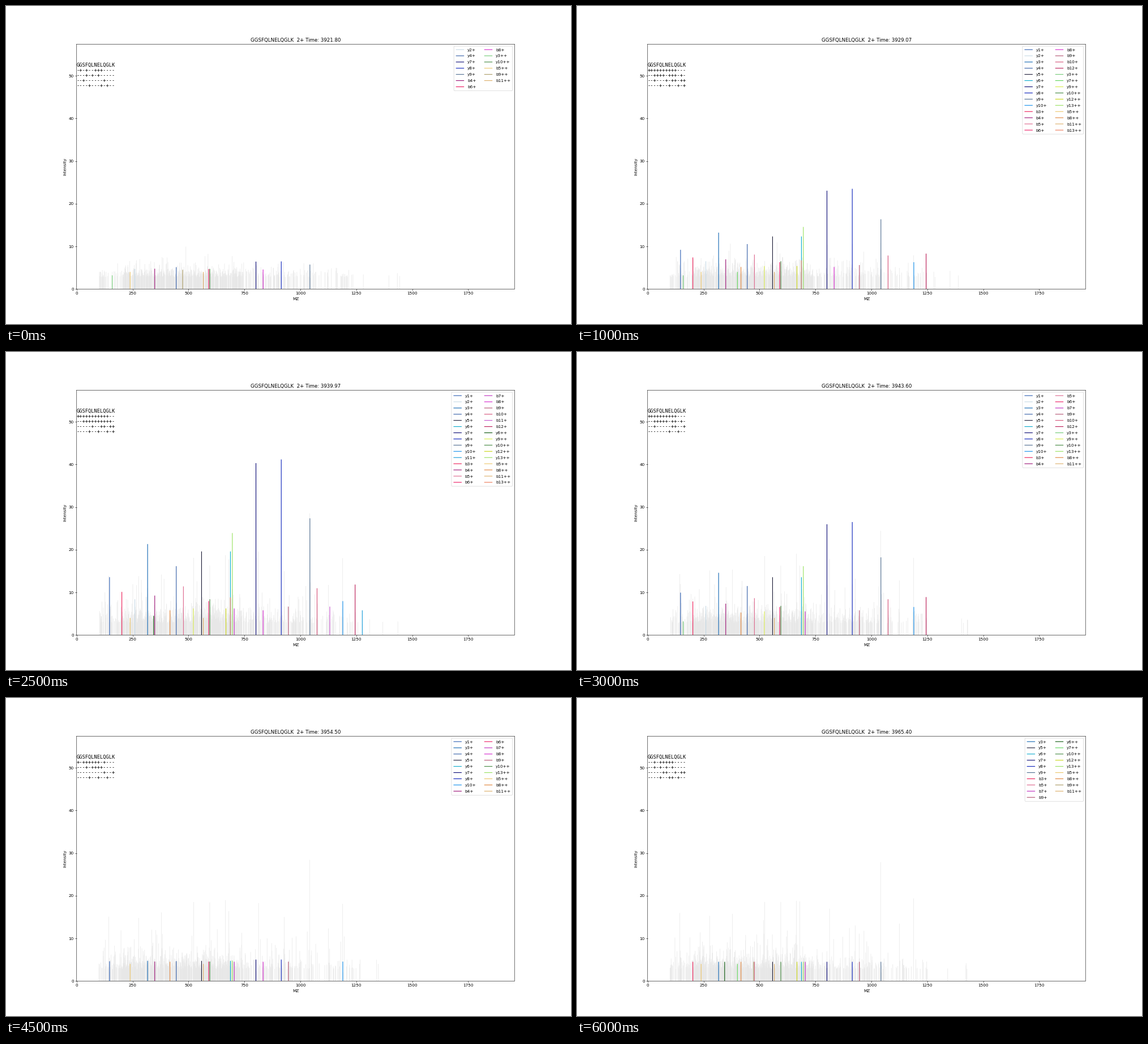
A matplotlib script for the animation above (6500 ms loop, 998 by 561 pixels).

```python
import numpy as np
import matplotlib.pyplot as plt
from matplotlib.animation import FuncAnimation

DPI = 52
N_SCANS = 13
SEQ = "GGSFQLNELQGLK"
MASS = dict(G=57.02146, S=87.03203, F=147.06841, Q=128.05858,
            L=113.08406, N=114.04293, E=129.04259, K=128.09496)
PROTON, WATER = 1.00728, 18.01056
TAIL = 4.5  # fragment height far from the elution apex

ions = {}


def ion(name, color, apex, seen):
    """Register a fragment with its apex height and the scans it is seen in."""
    charge = name.count("+")
    n = int(name[1:].rstrip("+"))
    part = SEQ[:n] if name[0] == "b" else SEQ[-n:]
    mass = sum(MASS[c] for c in part) + (WATER if name[0] == "y" else 0)
    scans = set()
    for span in seen.split():
        first, _, last = span.partition("-")
        scans.update(range(int(first), int(last or first) + 1))
    ions[name] = (mass / charge + PROTON, color, apex, scans)


ion("y1+", "#2458b0", 15, "1-7 9-11")
ion("y2+", "#c4d8e4", 9, "0-8 10")
ion("y3+", "#0860b0", 24, "1-12")
ion("y4+", "#2c58a4", 18, "0-11")
ion("y5+", "#141430", 22, "1-12")
ion("y6+", "#00a8cc", 22, "1-12")
ion("y7+", "#000070", 46, "0-12")
ion("y8+", "#0018b8", 47, "0-12")
ion("y9+", "#48688c", 31, "0-8 11-12")
ion("y10+", "#0c8cec", 8.5, "2-10")
ion("y11+", "#0c98d8", 6, "3-5")
ion("b2+", "#b81050", 4.6, "3-4")
ion("b3+", "#ec1450", 11, "2-8 11-12")
ion("b4+", "#980870", 10, "0-9")
ion("b5+", "#dc6088", 12.5, "2-8 11-12")
ion("b6+", "#ec105c", 8.5, "0-10")
ion("b7+", "#bc24bc", 6.5, "5-12")
ion("b8+", "#d41ccc", 6, "0-5 9")
ion("b9+", "#b04c6c", 7, "2-6 8-12")
ion("b10+", "#d44c74", 12, "2-6")
ion("b11+", "#c44ccc", 7, "3-5")
ion("b12+", "#b81450", 13, "2-6")
ion("y3++", "#6cc870", 3.2, "0-2 6")
ion("y6++", "#005000", 4.5, "4-5 12")
ion("y7++", "#58d454", 4, "2 7 11-12")
ion("y9++", "#d8ec48", 6.5, "2-6 8")
ion("y10++", "#3c8438", 9, "0-12")
ion("y12++", "#c8d40c", 6.5, "2-5 11-12")
ion("y13++", "#94e058", 27, "2-12")
ion("b5++", "#ecc464", 4, "0-2 5 9-12")
ion("b8++", "#e08034", 6, "2 5-12")
ion("b9++", "#a89860", 4.5, "0 12")
ion("b11++", "#dcac64", 4, "0-6 9-12")
ion("b13++", "#ec7450", 9.5, "2-5")

# Strong background peaks, m/z: height
TALL = {144: 15, 277: 15, 379: 15.5, 523: 18, 595: 18, 665: 19.5, 680: 18,
        813: 18.5, 928: 14, 1041.5: 27, 1125: 12.5, 1189: 20}


def elution(scan):
    return np.exp(-((scan - 4.1) / 2.34) ** 2)


def found(scan):
    """Heights of the fragments seen in one scan, in legend order."""
    peaks = {}
    for name, (_, _, apex, scans) in ions.items():
        if scan in scans:
            tail = min(TAIL, apex)
            peaks[name] = tail + (apex - tail) * elution(scan)
    return peaks


def marks(peaks, kind, charge):
    return "".join("+" if f"{kind}{n}{charge}" in peaks else "-"
                   for n in range(1, len(SEQ) + 1))


def background(scan, peaks):
    rng = np.random.default_rng(40 + scan)
    ramp = np.clip((scan - 0.5) / 4, 0, 1)
    x = np.concatenate([
        rng.uniform(200, 740, 450),
        rng.uniform(100, 1040, int(260 + 160 * ramp)),
        rng.uniform(1040, 1250, 35),
        rng.uniform(1250, 1450, 4),
    ])
    y = 2.8 + rng.exponential(0.9 + 0.5 * ramp, x.size)
    y = np.where(x < 1200, y, np.minimum(y, 5))

    tall = [(mz, h * ramp * rng.uniform(0.9, 1.08)) for mz, h in TALL.items()]
    medium = [(mz, 4 + 9 * ramp * rng.random())
              for mz in rng.uniform(115, 1080, 25)]
    isotopes = [(ions[n][0] + 1 / n.count("+"), 0.45 * h)
                for n, h in peaks.items()]
    more_x, more_y = np.array(tall + medium + isotopes).T
    return np.append(x, more_x), np.append(y, more_y)


def draw(scan):
    ax.clear()
    peaks = found(scan)
    x, y = background(scan, peaks)
    ax.vlines(x, 0, y, color="#e7e7e7", lw=1)
    for name, height in peaks.items():
        mz, color = ions[name][:2]
        ax.plot([mz, mz], [0, height], color=color, label=name,
                solid_capstyle="butt")

    rows = [SEQ] + [marks(peaks, k, c) for c in ("+", "++") for k in "yb"]
    for i, text in enumerate(rows):
        ax.text(0, 52.15 - 1.2 * i, text, family="DejaVu Sans Mono", size=12)

    ax.set_xlim(0, 1957)
    ax.set_ylim(0, 57.4)
    ax.set_xticks(range(0, 1751, 250))
    ax.set_yticks(range(0, 51, 10))
    ax.set_xlabel("MZ", labelpad=5.7)
    ax.set_ylabel("Intensity")
    ax.set_title(f"{SEQ}  2+ Time: {3921.80 + scan * 10.9 / 3:.2f}")
    ax.legend(loc="upper right", ncol=2, labelspacing=0.674, borderpad=0.487)
    return []


plt.rcParams["font.family"] = "DejaVu Sans"
plt.rcParams["path.snap"] = False
fig, ax = plt.subplots(figsize=(998.01 / DPI, 561.01 / DPI), dpi=DPI)
anim = FuncAnimation(fig, draw, frames=N_SCANS, interval=500,
                     repeat=True, repeat_delay=0)
plt.show()
```
